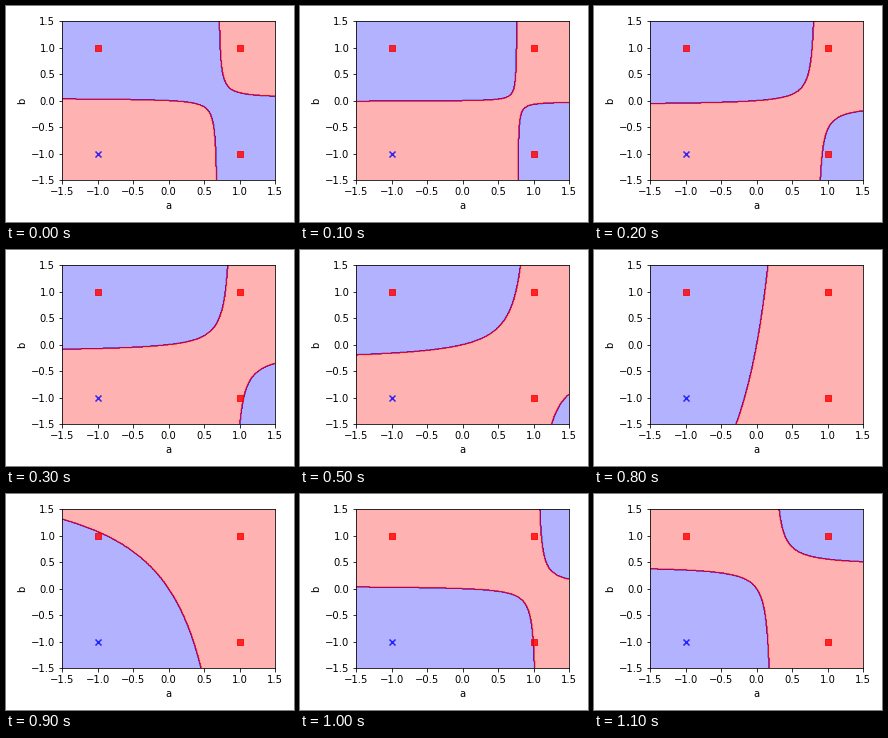
These frames come from a looping animation (288 by 216 pixels, 1.3 s). A matplotlib script:

```python
import numpy as np
import matplotlib.pyplot as plt
from matplotlib.animation import FuncAnimation

W, H, DPI = 288, 216, 72
STEPS, LAST = 13, 11
RED, BLUE = "#ff0000", "#0000ff"

# Boundary: w*a*b + u*a + v*b = 0, blue where negative.
KEY_T = np.array([0, 2, 5, 7, 9, 10, 11], float)
KEY_W = np.array([
    (1, -0.046, -0.695),
    (1, 0.083, -0.848),
    (1, 0.317, -0.989),
    (1, 0.824, -0.971),
    (-1, 2.33, 1.17),
    (-1, 0.054, 1.05),
    (-1, 0.43, 0.226),
])
KEY_W /= np.linalg.norm(KEY_W, axis=1, keepdims=True)
SLOPE = np.gradient(KEY_W, KEY_T, axis=0)


def weights(t):
    """Cubic Hermite path through the key weights."""
    i = min(np.searchsorted(KEY_T, t, side="right") - 1, len(KEY_T) - 2)
    h = KEY_T[i + 1] - KEY_T[i]
    s = (t - KEY_T[i]) / h
    return ((1 + 2 * s) * (1 - s) ** 2 * KEY_W[i]
            + s * (1 - s) ** 2 * h * SLOPE[i]
            + s * s * (3 - 2 * s) * KEY_W[i + 1]
            + s * s * (s - 1) * h * SLOPE[i + 1])


plt.rcParams.update({"font.family": "DejaVu Sans", "font.size": 10})
fig = plt.figure(figsize=(W / DPI, H / DPI), dpi=DPI, facecolor="white")
ax = fig.add_axes([56.3 / W, 1 - 174.3 / H, 212.7 / W, 159.3 / H])
ax.set(xlim=(-1.5, 1.5), ylim=(-1.5, 1.5), xlabel="a", ylabel="b")
ticks = np.arange(-1.5, 1.6, 0.5)
ax.set_xticks(ticks)
ax.set_yticks(ticks)

ax.scatter([-1, 1, 1], [1, 1, -1], marker="s", c=RED, alpha=0.8, zorder=3)
ax.scatter([-1], [-1], marker="x", c=BLUE, alpha=0.8, zorder=3)

grid = np.linspace(-1.5, 1.5, 301)
A, B = np.meshgrid(grid, grid)
layers = []


def draw(i):
    while layers:
        layers.pop().remove()
    w, u, v = weights(min(i, LAST))
    side = np.where(w * A * B + u * A + v * B < 0, -1.0, 1.0)
    layers.append(ax.contourf(A, B, side, levels=[-2, 0, 2],
                              colors=[BLUE, RED], alpha=0.3, zorder=1))
    layers.append(ax.contour(A, B, side, levels=[-0.6, 0.6],
                             colors=[BLUE, RED], linewidths=0.9, zorder=2))
    return layers


anim = FuncAnimation(fig, draw, frames=STEPS, init_func=lambda: [],
                     interval=100, repeat=True, repeat_delay=0, blit=False)
plt.show()
```
